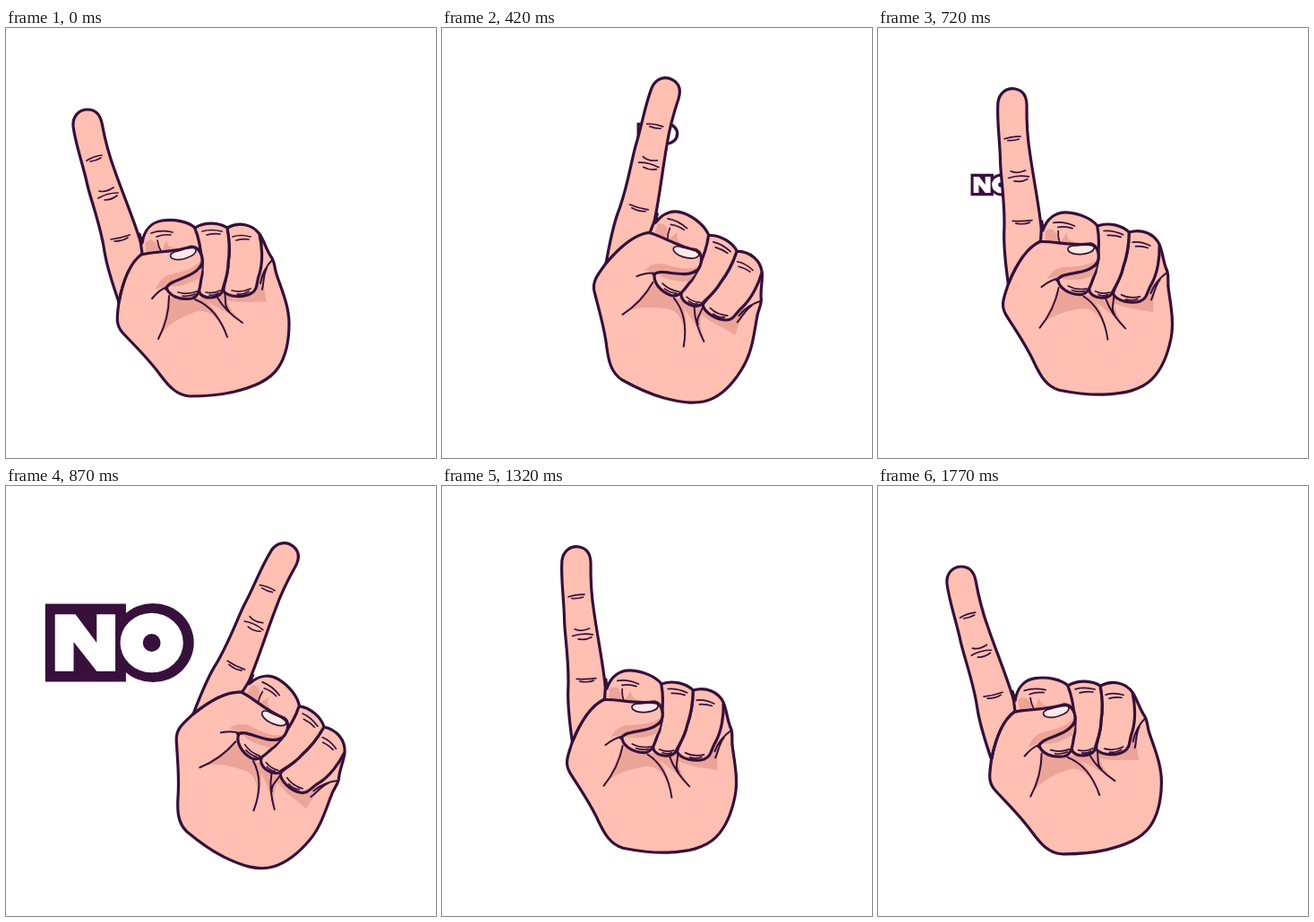
An HTML page that plays this animation: 480x480 px, repeating every 1.8 s.

```html
<!DOCTYPE html>
<html lang="en">
<head>
<meta charset="utf-8">
<title>No</title>
<style>
  html, body { margin: 0; width: 100%; height: 100%; overflow: hidden; background: #fff; }
  svg { display: block; width: 100%; height: 100%; }
  .ink { stroke: #34103a; stroke-linecap: round; stroke-linejoin: round; fill: none; }
  .skin { fill: #ffbfb3; stroke-width: 3.2; }
  .shade { fill: #eda498; }
  .thin { stroke-width: 1.7; }
  .nail { fill: #ffebe5; }
</style>
</head>
<body>
<svg viewBox="0 0 480 480">
  <defs>
    <g id="no" role="img" aria-label="NO">
      <g fill="#38103c">
        <path d="M-84 -44H7V44H-84Z"/>
        <ellipse cx="37.5" rx="46" ry="44.5"/>
      </g>
      <g fill="#fff">
        <path d="M-73 32V-32H-50L-26 0V-32H-5V32H-26L-52 -1V32Z"/>
        <ellipse cx="36" rx="35.5" ry="33.5"/>
      </g>
      <circle fill="#38103c" cx="36" r="10"/>
    </g>
  </defs>

  <g id="words"></g>

  <g id="hand">
    <!-- pointing finger and palm -->
    <path class="ink skin" d="M126 306C119 286 113 268 110 250C106 222 96 196 91 176C86 152 78 132 75 110C74 99 81 91 91 91
      C100 91 105 97 107 106C110 122 115 142 121 158C130 184 142 212 150 238L160 250L150 290Z"/>
    <path class="ink skin" d="M149 230L152 240C154 226 162 217 174 215C188 213 203 216 211 223C222 216 238 217 247 223
      C260 216 275 219 283 230C289 239 290 247 297 257C301 264 299 268 303 278C309 295 316 312 316 330
      C316 350 312 367 304 379C294 394 275 401 255 406C238 410 220 411 205 411C190 410 181 399 172 387
      C159 369 143 354 130 340C122 331 124 322 126 306C131 282 138 264 152 252Z"/>

    <!-- shadows -->
    <path class="shade" d="M155 240C160 234 168 236 172 249L157 251Z"/>
    <path class="shade" d="M179 236C179 245 188 249 205 244L196 249L174 250Z"/>
    <path class="shade" d="M181 301C179 318 176 328 171 344C180 331 193 324 211 317C222 313 234 320 241 334
      C239 322 232 313 226 307C240 314 250 319 262 326C254 319 249 312 247 304C263 308 281 304 291 306
      C289 296 287 285 287 270L276 296L245 296L215 301Z"/>

    <!-- curled fingers -->
    <path class="ink skin" d="M247 224C250 240 250 252 248 263C248 277 242 288 243 294C249 301 265 301 274 296
      C282 291 279 284 283 274C287 261 286 243 283 231"/>
    <path class="ink skin" d="M211 224C217 238 218 252 219 264C218 280 212 290 217 297C223 303 236 302 241 295
      C243 286 248 276 248 263C250 248 249 234 247 224"/>
    <path class="ink skin" d="M179 289C181 299 194 304 207 302C218 299 216 286 219 275L219 258Z"/>
    <path class="shade" d="M219 267C213 276 195 281 181 288C192 290 207 285 217 278Z"/>

    <!-- thumb -->
    <path fill="#ffbfb3" d="M129 300C134 276 143 259 153 252C170 250 190 249 207 244C216 245 220 255 219 263
      C213 276 193 280 179 290L160 310Z"/>
    <path class="shade" d="M219 257C212 268 198 272 184 275C175 277 170 284 167 292C173 290 179 288 188 283
      C201 278 216 273 219 264Z"/>
    <path class="ink" stroke-width="3.2" d="M126 306C131 280 140 261 151 253C163 249 188 251 207 244
      C216 244 220 255 219 262C215 274 199 278 188 283C182 285 180 288 178 291"/>
    <path class="ink thin nail" d="M185 257C181 253 186 250 192 249C200 247 209 243 212 247
      C213 252 207 255 201 257C195 259 189 259 185 257Z"/>

    <!-- palm and wrist lines -->
    <path class="ink" stroke-width="2" d="M180 289C173 291 168 296 163 302M182 299C182 317 177 334 170 347
      M211 303C229 310 240 325 247 345M236 301C243 313 252 321 264 329
      M298 258C291 265 286 273 284 285M291 268C287 276 288 284 286 292M244 295C246 304 243 310 249 316"/>

    <!-- knuckle creases -->
    <path class="ink thin" d="M90 148Q98 143 107 142M94 149Q101 148 106 145
      M104 182Q111 184 120 178M103 190Q113 184 125 184M110 192Q118 192 124 187
      M117 236Q127 235 138 231M121 238Q130 238 136 234
      M162 229Q173 225 186 228M168 233Q176 230 184 231M169 237Q170 244 173 249
      M219 227Q229 224 241 227M224 231Q232 229 239 230
      M253 233Q262 230 273 233M257 237Q265 235 271 236
      M192 295Q202 298 213 294M197 299Q205 300 211 297
      M223 295Q231 297 239 293M227 298Q233 299 237 296
      M252 293Q262 296 273 291M258 297Q265 298 271 294"/>
  </g>
</svg>
<script>
  const LOOP = 1800, SWING = 300, ANGLE = 40.5, SHRINK = 120;
  const spots = [[381, 180.5], [241, 118], [127, 175]];
  const hand = document.getElementById('hand');
  const words = spots.map(() => {
    const use = document.createElementNS('http://www.w3.org/2000/svg', 'use');
    use.setAttribute('href', '#no');
    return document.getElementById('words').appendChild(use);
  });

  // Cubic bezier easing (.6, 0, .4, 1), solved by bisection.
  function ease(p) {
    if (p <= 0) return 0;
    if (p >= 1) return 1;
    let lo = 0, hi = 1;
    for (let i = 0; i < 24; i++) {
      const m = (lo + hi) / 2;
      if (m * (1.8 - 2.4 * m + 1.6 * m * m) < p) lo = m; else hi = m;
    }
    return lo * lo * (3 - 2 * lo);
  }

  function draw(t) {
    const phase = t % (2 * SWING);
    const swing = ease(1 - Math.abs(phase / SWING - 1));
    hand.setAttribute('transform', `rotate(${ANGLE * swing} 238 394)`);
    words.forEach((word, i) => {
      const age = t - i * SWING;
      const size = age < SWING ? ease(age / SWING) : 1 - ease((age - SWING) / SHRINK);
      word.setAttribute('visibility', size > 0 ? 'visible' : 'hidden');
      word.setAttribute('transform', `translate(${spots[i]}) scale(${size})`);
    });
  }

  const start = performance.now();
  function tick() {
    draw((performance.now() - start) % LOOP);
    requestAnimationFrame(tick);
  }
  tick();
</script>
</body>
</html>
```
